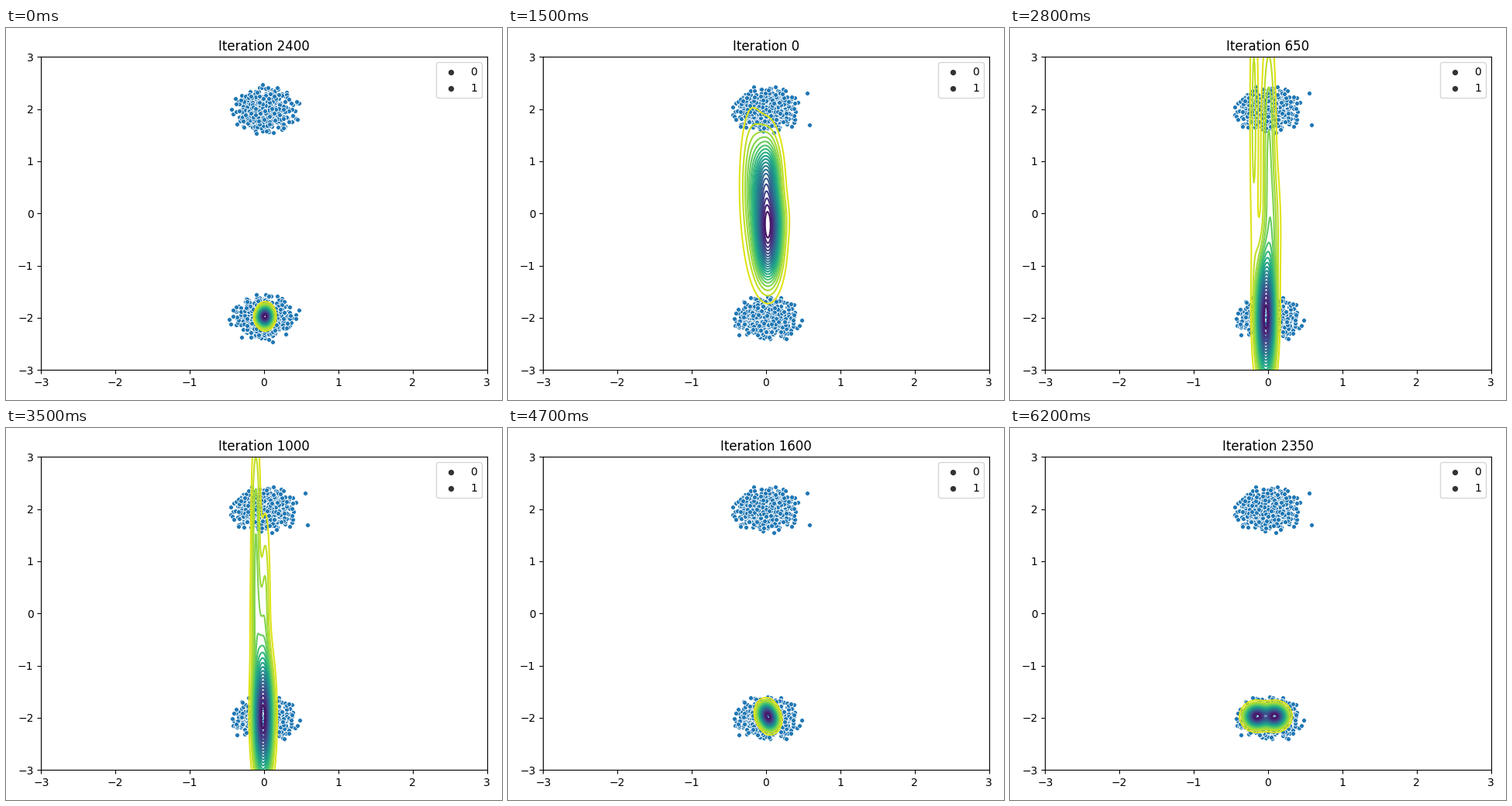
A matplotlib script that plays this animation: 640 px wide and 480 px high, repeating every 8.2 s.

```python
import numpy as np
import matplotlib.pyplot as plt
from matplotlib.animation import FuncAnimation

STEP_MS = 100
FRAMES = 82
LAST = 62        # the final picture is held from here on
RESTART = 15     # second training run begins
LINES = 20

rng = np.random.default_rng(7)


def two_clusters(n=800, spread=0.165, limit=0.49):
    pts = rng.normal(0, spread, (2 * n, 2))
    pts[:, 1] += np.repeat([2, -2], n)
    r = np.hypot(pts[:, 0], np.abs(pts[:, 1]) - 2)
    return pts[r < limit]


def ease(start, end, t):
    u = np.clip((t - start) / (end - start), 0, 1)
    return u * u * (3 - 2 * u)


def mix(a, b, u):
    return a + (b - a) * u


# Each blob of generated density is (x, y, sigma x, sigma y, weight).

def first_run(t):
    """A compact head that moves left and leaves a tail behind it."""
    u = t / 9 if t < 9 else 1
    return [
        (mix(.02, -.08, u), -1.97, .06, .115, .90),
        (mix(-.01, -.22, u), -1.98, mix(.05, .07, u), .11, mix(.2, .35, u)),
        (mix(-.07, -.33, u), -2.0, .035, .075, mix(.1, .15, u)),
    ]


def second_run(t):
    """A tall ridge drains into the lower cluster, then splits sideways."""
    grow = ease(0, 5, t)
    fade = ease(5, 13, t)
    lean = ease(13, 20, t)
    shrink = ease(19, 32, t)
    split = ease(32, 47, t)
    tail = 1 - shrink

    x = -.03 * np.sin(2 * np.pi * (t - 6) / 32)
    dx = .03 * shrink + .095 * split
    dy = .07 * shrink * (1 - split)
    sx = mix(.11, .077, fade) - .009 * shrink + .025 * split
    sy = mix(mix(1.2, .72, fade), .125, shrink)
    blobs = np.array([
        (x - dx, -2 + .03 * shrink + dy, sx, sy, .45),
        (x + dx, -2 + .03 * shrink - dy, sx, sy, .45),
        (mix(.06, -.06, lean), -.3, mix(.125, .075, fade), .8,
         mix(.25, .12, fade) * tail),
        (mix(.01, -.11, lean), mix(1.8, 1.4, fade),
         mix(.11, .06, fade) - .02 * lean, 1.4, mix(.82, .17, fade) * tail),
        (mix(-.19, .02, lean), mix(1.8, .6, lean), mix(.1, .04, fade),
         mix(2.2, 1, lean), mix(.22, .1, fade) * tail),
    ])
    # the untrained generator sits near the origin
    blobs[:, 1] *= mix(.3, 1, grow)
    blobs[:, 3] *= mix(.4, 1, grow)
    return blobs[blobs[:, 4] > .005]


def density(blobs):
    _, y, _, sy, _ = np.transpose(blobs)
    lo = max((y - 3.2 * sy).min(), -3.1)
    hi = min((y + 3.2 * sy).max(), 3.1)
    gx, gy = np.meshgrid(np.linspace(-.6, .6, 121), np.linspace(lo, hi, 260))
    z = sum(w * np.exp(-((gx - cx) / sx) ** 2 / 2 - ((gy - cy) / s) ** 2 / 2)
            for cx, cy, sx, s, w in blobs)
    return gx, gy, z


data1 = two_clusters()
data2 = np.vstack([two_clusters(), [(.55, 2.3), (.58, 1.7)]])

fig, ax = plt.subplots(figsize=(6.4, 4.8), dpi=100)
clouds = [ax.scatter(*d.T, s=18, color="C0", edgecolor="w", linewidth=.55)
          for d in (data1, data2)]
for name in "01":
    ax.scatter([], [], s=18, color=".2", label=name)
ax.set(xlim=(-3, 3), ylim=(-3, 3))
ax.legend(loc="upper right")
title = ax.set_title("Iteration 2400")
fig.tight_layout()

drawn = []


def update(k):
    n = min(k, LAST)
    second = n >= RESTART
    clouds[0].set_visible(not second)
    clouds[1].set_visible(second)
    title.set_text(f"Iteration {50 * (n - RESTART) if second else 2400 + 50 * n}")
    while drawn:
        drawn.pop().remove()
    gx, gy, z = density(second_run(n - RESTART) if second else first_run(n))
    top = z.max()
    levels = np.arange(1, LINES + 1) * top / (LINES + 1)
    drawn.append(ax.contour(gx, gy, z, levels, cmap="viridis_r",
                            vmin=0, vmax=top, linewidths=1.5))
    return []


anim = FuncAnimation(fig, update, frames=FRAMES, interval=STEP_MS,
                     init_func=lambda: [], repeat=True, repeat_delay=0)
plt.show()
```
